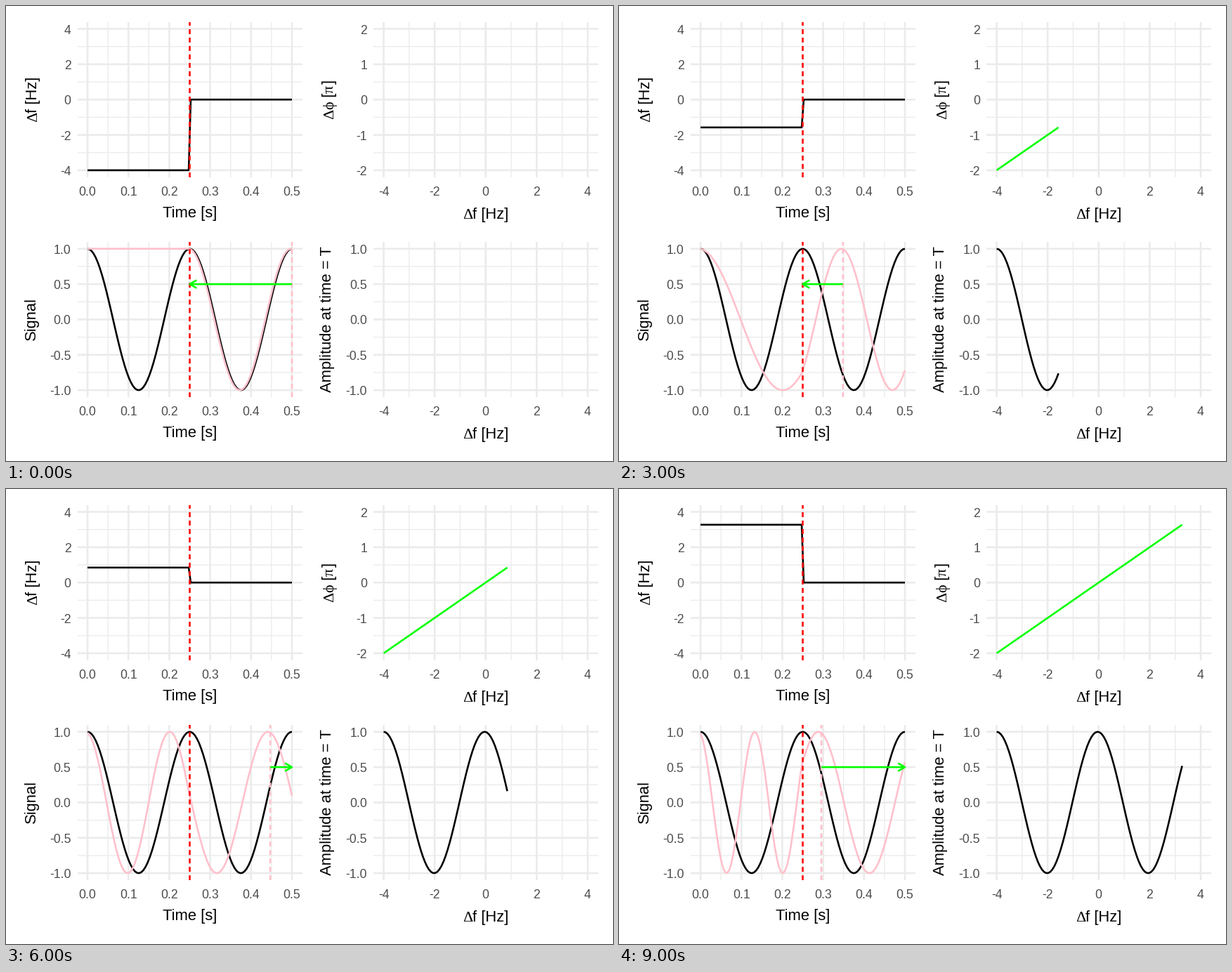
Write a matplotlib script that moves like this. It is 864 px wide and 648 px high and loops after 10 s.

```python
import numpy as np
import matplotlib.pyplot as plt
from matplotlib.animation import FuncAnimation

plt.rcParams["path.snap"] = False   # keep lines at their sub-pixel places

W, H, DPI = 864, 648, 144
PX = 72 / DPI                       # points per pixel
SANS, SERIF = ["Liberation Sans"], ["Liberation Serif", "DejaVu Serif"]
EM = 22                             # title size in pixels
LINE = 2.6                          # main line width in pixels

N, STEPS, FRAMES = 100, 100, 10
F0, SWITCH = 4, 0.25                # base frequency, end of the first half
t = np.linspace(0, 0.5, N)
dt = t[1]
detune = np.linspace(-4, 4, STEPS)
amplitude = np.cos(2 * np.pi * (F0 + detune) * dt * N / 2)

fig = plt.figure(figsize=(W / DPI, H / DPI), dpi=DPI, facecolor="white")


def text(x, y, s, size=EM, family=SANS, color="black", **kw):
    kw = {"ha": "center", "va": "baseline", "rotation_mode": "anchor", **kw}
    fig.text(x / W, 1 - y / H, s, fontsize=size * PX, family=family,
             color=color, **kw)


def symbol_title(x, y, runs, vertical=False):
    """Centre runs of (string, family, advance in em) on one baseline."""
    pos = -sum(run[2] for run in runs) * EM / 2
    for s, family, advance in runs:
        if vertical:
            text(x, y - pos, s, family=family, ha="left", rotation=90)
        else:
            text(x + pos, y, s, family=family, ha="left")
        pos += advance * EM


def panel(left, top, width, xlim, ylim, xticks, yticks, xfmt, yfmt):
    height = 221.5
    ax = fig.add_axes([left / W, 1 - (top + height) / H, width / W, height / H])
    ax.set(xlim=xlim, ylim=ylim)
    ax.axis("off")
    for ticks, rule in ((xticks, ax.axvline), (yticks, ax.axhline)):
        for v in (ticks[:-1] + ticks[1:]) / 2:
            rule(v, color="#ebebeb", lw=LINE / 2 * PX, zorder=0)
        for v in ticks:
            rule(v, color="#ebebeb", lw=LINE * PX, zorder=0.5)
    for v in xticks:
        x = left + (v - xlim[0]) / (xlim[1] - xlim[0]) * width
        text(x, top + height + 26, format(v, xfmt), 17.6, color="#4d4d4d")
    for v in yticks:
        y = top + (ylim[1] - v) / (ylim[1] - ylim[0]) * height
        text(left - 9, y + 7, format(v, yfmt), 17.6, color="#4d4d4d", ha="right")
    return ax


def curve(ax, color, z, x=(), y=(), **kw):
    return ax.plot(x, y, color=color, lw=LINE * PX, zorder=z,
                   solid_capstyle="butt", **kw)[0]


def dashed(ax, x, color, z):
    return ax.axvline(x, color=color, lw=LINE * PX, zorder=z,
                      linestyle=(0, (7 / LINE, 5 / LINE)), dash_capstyle="butt")


seconds = np.arange(6) / 10
hertz = np.arange(-4, 5, 2)
turns = np.arange(-2, 3)
level = np.arange(-2, 3) / 2
time_lim, hz_lim = (-0.025, 0.525), (-4.4, 4.4)

shift_ax = panel(101.5, 22.5, 320, time_lim, hz_lim, seconds, hertz, ".1f", "d")
phase_ax = panel(523, 22.5, 319.5, hz_lim, (-2.2, 2.2), hertz, turns, "d", "d")
signal_ax = panel(101.5, 335.7, 320, time_lim, (-1.1, 1.1), seconds, level, ".1f", ".1f")
amp_ax = panel(523, 335.7, 319.5, hz_lim, (-1.1, 1.1), hertz, level, "d", ".1f")

delta_f = [("Δ", SERIF, 0.612), ("f [Hz]", SANS, 2.334)]
delta_phi = [("Δ", SERIF, 0.612), ("ϕ", SERIF, 0.521), (" [", SANS, 0.556),
             ("π", SERIF, 0.549), ("]", SANS, 0.278)]
for base in (301, 614):
    text(261.5, base, "Time [s]")
    symbol_title(682.7, base + 2, delta_f)
symbol_title(44, 133, delta_f, vertical=True)
symbol_title(466, 133, delta_phi, vertical=True)
text(42, 446, "Signal", rotation=90)
text(463, 446, "Amplitude at time = T", rotation=90)

step_line = curve(shift_ax, "black", 2)
phase_line = curve(phase_ax, "lime", 2)
amp_line = curve(amp_ax, "black", 2)
curve(signal_ax, "black", 2, t, np.cos(2 * np.pi * F0 * t))
shifted_line = curve(signal_ax, "pink", 3)
dashed(shift_ax, SWITCH, "red", 4)
dashed(signal_ax, SWITCH, "red", 4)
peak_mark = dashed(signal_ax, 0.5, "pink", 5)
shaft = curve(signal_ax, "lime", 6)
head = curve(signal_ax, "lime", 6, solid_joinstyle="round")


def draw(i):
    k = i * STEPS // FRAMES
    df = detune[k]
    offset = np.where(t < SWITCH, df, 0)
    step_line.set_data(t, offset)
    shifted_line.set_data(t, np.cos(2 * np.pi * np.cumsum(F0 + offset) * dt))

    tip = SWITCH if df < 0 else 0.5
    peak = tip - df / 16
    peak_mark.set_xdata([peak, peak])
    back = tip - np.sign(df) * 0.0168
    shaft.set_data([peak, tip], [0.5, 0.5])
    head.set_data([back, tip, back], [0.556, 0.5, 0.444])

    seen = slice(0, k + 1)
    phase_line.set_data(detune[seen], detune[seen] / 2)
    amp_line.set_data(detune[seen], amplitude[seen])
    return step_line, shifted_line, peak_mark, shaft, head, phase_line, amp_line


anim = FuncAnimation(fig, draw, frames=FRAMES, interval=1000, repeat=True,
                     repeat_delay=0, blit=False)
plt.show()
```
